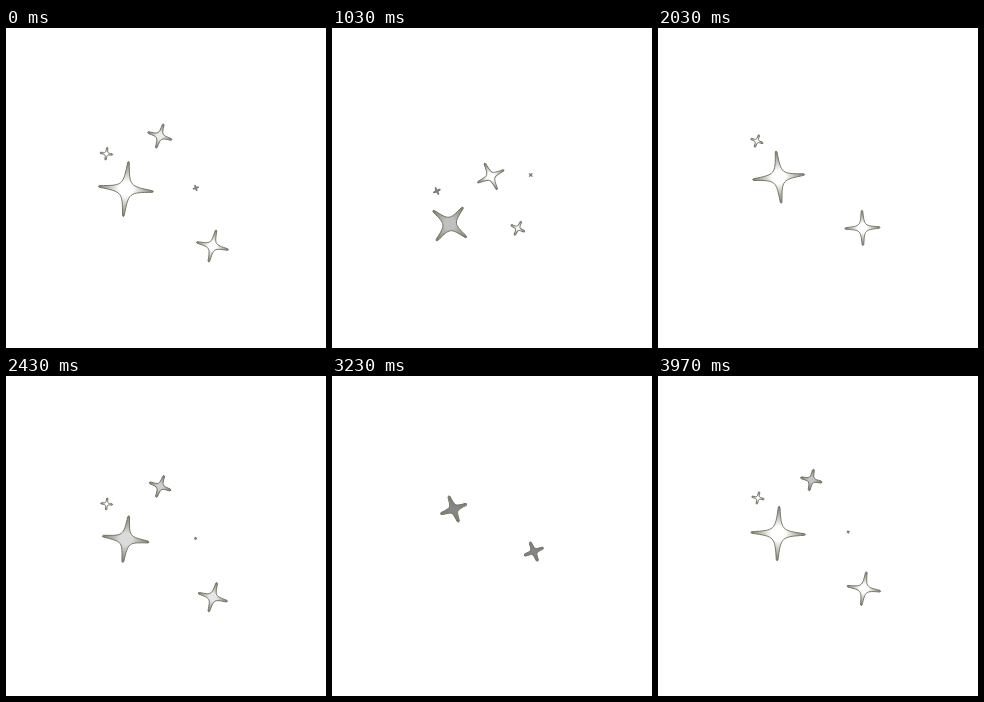
Recreate the animation shown at these times as an HTML page with a canvas. Size 320 px wide and 320 px high, loop 4030 ms.

```html
<!DOCTYPE html>
<html lang="en">
<head>
<meta charset="utf-8">
<title>Falling sparkles</title>
<style>
  html, body { margin: 0; width: 100%; height: 100%; overflow: hidden; background: #fff; }
  canvas { display: block; width: 100vw; height: 100vh; }
</style>
</head>
<body>
<canvas id="stage" width="320" height="320"></canvas>
<script>
const ctx = document.getElementById('stage').getContext('2d');
const LOOP = 4030, STEPS = 40;

// Two showers follow the same paths, starting this many steps into the loop.
const showers = [23.4, STEPS];

// x, y, rot: [value, change per step]; lives: [born, gone] in each shower;
// pace: steps it takes to grow or shrink
const stars = [
  { x: [119.9, -0.22], y: [161, 3.5], rot: [5.5, 3.3], size: 29, pace: 5, lives: [[10.8, 30], [29.3, 54.9]] },
  { x: [100.4, 0.45], y: [125.7, 3.73], rot: [8, -3.35], size: 7, pace: 3, lives: [[11, 29], [33, 52]] },
  { x: [153.8, 0.5], y: [108, 4.03], rot: [17, 4.75], size: 15, pace: 3, lives: [[20.5, 30], [36, 58.8]] },
  { x: [206.4, 0.57], y: [218, 5.3], rot: [13.2, 4.4], size: 18.3, pace: 3, lives: [[9.6, 27.8], [30, 44.8]] },
  { x: [189.8, -0.4], y: [160, 4.03], rot: [72, -4.6], size: 9, pace: 5, lives: [[23, 31], [38, 57.5]] }
];

const clamp = v => Math.max(0, Math.min(1, v));
const ease = v => Math.tanh(Math.max(0, v));

// One step lasts 100 ms, with a short hold late in the loop.
function stepAt(t) {
  const late = Math.floor((t - 70) / 100);
  const early = Math.floor((t - 30) / 100);
  return Math.max(0, t < 3430 ? Math.min(33, early) : late);
}

function sparkle(x, y, r, deg, light) {
  const c = r * (0.15 - 0.035 * light);
  const w = Math.min(r * 0.12, 1.2 - 0.4 * light);
  const g = Math.round(134 + 121 * light);
  ctx.save();
  ctx.translate(x, y);
  ctx.rotate(deg * Math.PI / 180);
  ctx.beginPath();
  ctx.moveTo(-w, -r + w);
  for (let i = 0; i < 4; i++) {
    ctx.quadraticCurveTo(0, -r - w, w, -r + w);
    ctx.bezierCurveTo(c, -c, c, -c, r - w, -w);
    ctx.rotate(Math.PI / 2);
  }
  ctx.closePath();
  const fill = ctx.createRadialGradient(0, 0, 0, 0, 0, r);
  fill.addColorStop(0.25, `rgb(${g},${g},${g})`);
  fill.addColorStop(1, '#7d7c68');
  ctx.fillStyle = fill;
  ctx.fill();
  ctx.lineWidth = 0.9;
  ctx.lineJoin = 'round';
  ctx.strokeStyle = '#737164';
  ctx.stroke();
  ctx.restore();
}

function draw(t) {
  const n = stepAt(t);
  ctx.fillStyle = '#fff';
  ctx.fillRect(0, 0, 320, 320);
  for (const s of stars) {
    s.lives.forEach(([born, gone], i) => {
      // The second shower carries on past the end of the loop.
      const u = i && n < STEPS / 2 ? n + STEPS : n;
      const grown = ease((u - born) / s.pace) * ease((gone - u) / s.pace);
      const r = s.size * grown - 0.4;
      if (r < 0.8) return;
      const at = ([v, d]) => v + d * (u - showers[i]);
      sparkle(at(s.x), at(s.y), r, at(s.rot), clamp((grown - 0.6) / 0.32));
    });
  }
}

let start;
function tick(now) {
  start ??= now;
  draw((now - start) % LOOP);
  requestAnimationFrame(tick);
}
draw(0);
requestAnimationFrame(tick);
</script>
</body>
</html>
```
